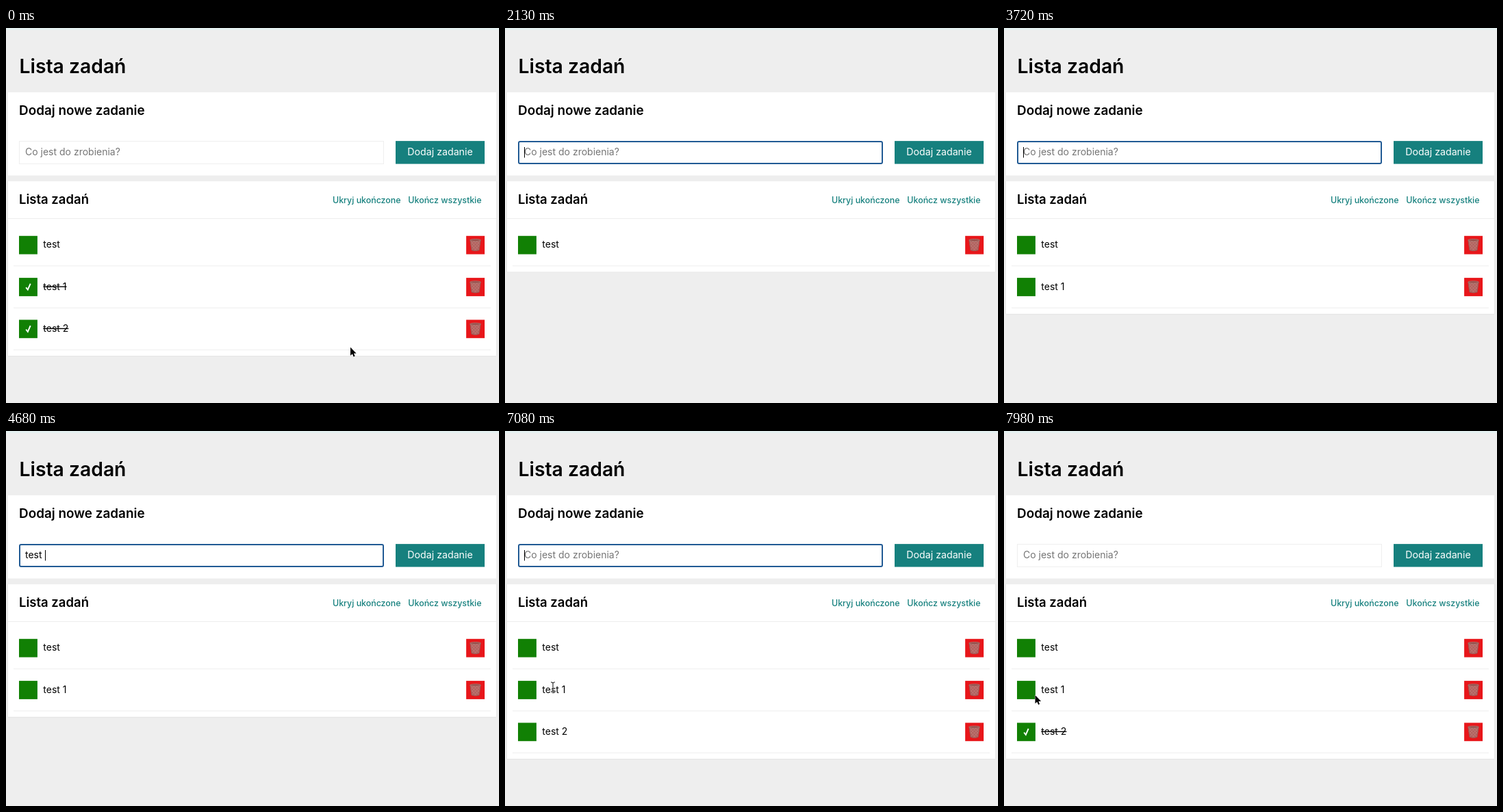
An HTML page for the animation above (8 s loop, 720 by 548 pixels).

```html
<!DOCTYPE html>
<html lang="pl">
<head>
<meta charset="utf-8">
<title>Lista zadań</title>
<style>
  html, body { margin: 0; width: 100%; height: 100%; overflow: hidden; background: #eee; }
  svg { display: block; width: 720px; height: 548px; }
  text { font: 400 14px Inter, "Open Sans", sans-serif; white-space: pre; }
  .title { font-size: 28.3px; font-weight: 600; }
  .head { font-size: 18.5px; font-weight: 600; }
  .link { font-size: 12.4px; font-weight: 500; fill: #16807e; }
  .done text { text-decoration: line-through; }
  .check { display: none; }
  .done .check { display: inline; }
</style>
</head>
<body>
<svg viewBox="0 0 720 548">
  <defs>
    <g id="bin">
      <path d="M5.8 6 L8 20.8 Q13.5 22.8 19 20.8 L21.2 6Z" fill="#b0615e"/>
      <path d="M7 8 L18.6 20 M10.5 7 L19.4 16 M14.5 7 L20.3 12.5 M7.6 13 L15.5 21.5 M20 8 L8.4 20 M16.5 7 L7.6 16 M12.5 7 L6.7 12.5 M19.4 13 L11.5 21.5"
        stroke="#c07f7a" stroke-width=".8" fill="none"/>
      <path d="M5.8 6 L8 20.8 Q13.5 22.8 19 20.8 L21.2 6" stroke="#935a55" stroke-width=".8" fill="none"/>
      <ellipse cx="13.5" cy="6" rx="7.8" ry="1.5" fill="#984c49" stroke="#a58078" stroke-width=".8"/>
    </g>
  </defs>
  <rect width="720" height="548" fill="#eee"/>
  <rect width="720" height="3" fill="#e5f1f1"/>
  <text class="title" x="19.5" y="66">Lista zadań</text>

  <rect x="3" y="94" width="713" height="121.5" fill="#fff"/>
  <text class="head" x="19" y="126.7" style="font-size:18.9px">Dodaj nowe zadanie</text>
  <rect id="field" fill="#fff"/>
  <text id="entry" x="28" y="186.3"></text>
  <rect id="caret" y="174" width="1" height="15.5"/>
  <rect x="569" y="165.1" width="130" height="33.5" fill="#16807e"/>
  <text x="634" y="186.3" text-anchor="middle" fill="#fff" style="font-size:14.2px">Dodaj zadanie</text>

  <rect id="shade" x="2.5" y="223" width="714" rx="1" fill="#dedede"/>
  <rect id="card" x="3" y="223.5" width="713" fill="#fff"/>
  <text class="head" x="19" y="257">Lista zadań</text>
  <rect x="3" y="278" width="713" height="1" fill="#eee"/>
  <g id="links">
    <text class="link" x="477" y="255.5">Ukryj ukończone</text>
    <text class="link" x="694.5" y="255.5" text-anchor="end">Ukończ wszystkie</text>
  </g>
  <g id="rows"></g>

  <path id="arrow" d="M0 0 V12.3 L2.8 9.8 L4.7 14 L6.6 13.1 L4.9 9.1 H8.6Z" fill="#000" stroke="#fff" stroke-width=".9" paint-order="stroke"/>
  <g id="beam" fill="none">
    <path d="M-3 -7 Q0 -7 0 -5 Q0 -7 3 -7 M0 -5 V5 M-3 7 Q0 7 0 5 Q0 7 3 7 M-1.6 2.5 H1.6" stroke="#fff" stroke-width="2.4"/>
    <path d="M-3 -7 Q0 -7 0 -5 Q0 -7 3 -7 M0 -5 V5 M-3 7 Q0 7 0 5 Q0 7 3 7 M-1.6 2.5 H1.6" stroke="#222" stroke-width="1.1"/>
  </g>
</svg>
<script>
const $ = id => document.getElementById(id);
const LOOP = 8000, RESET = 450, FOCUS = 720, CHECK = 7560, PITCH = 61.3;
const NAMES = ["test", "test 1", "test 2"];
const HINT = "Co jest do zrobienia?";

// Each entry: what is typed, the time of every key, the time it is added.
const ENTRIES = [
  { text: "test ", keys: [780, 860, 940, 1020, 1110], add: 1380 },
  { text: "test 1", keys: [2250, 2340, 2430, 2520, 2610, 2700], add: 2940 },
  { text: "test 2", keys: [4350, 4430, 4510, 4590, 4670, 5790], add: 6090 }
];

// Pointer path: time, x, y
const START = [[450, 200, 56], [630, 200, 56], [720, 110, 186]];
const END = [[6690, 110, 186], [7080, 70, 374], [7400, 33, 439], [7620, 33, 439], [7950, 45.5, 386]];

$("rows").innerHTML = NAMES.map((name, i) => `
  <g transform="translate(0 ${(i * PITCH).toFixed(1)})">
    <rect x="19" y="303.8" width="26.9" height="26.8" fill="#118004"/>
    <path class="check" d="M29.2 317.9 L31.8 321.2 L35.7 312.4" fill="none" stroke="#fff" stroke-width="1.9"/>
    <text x="54.3" y="321.4">${name}</text>
    <rect x="672.1" y="303.8" width="26.9" height="26.8" fill="#e8161a"/>
    <use href="#bin" x="672" y="304"/>
    <rect x="11" y="347.2" width="697" height="1" fill="#eee"/>
  </g>`).join("");
const rows = [...$("rows").children];
const pen = document.createElement("canvas").getContext("2d");

function set(el, attrs) {
  for (const k in attrs) el.setAttribute(k, attrs[k]);
}
function show(el, on) {
  el.style.display = on ? "" : "none";
}

function along(path, t) {
  const last = path[path.length - 1];
  if (t >= last[0]) return last.slice(1);
  const i = path.findIndex(p => p[0] > t);
  const [a, b] = [path[i - 1], path[i]];
  const u = (t - a[0]) / (b[0] - a[0]);
  const e = u * u * (3 - 2 * u);
  return [a[1] + (b[1] - a[1]) * e, a[2] + (b[2] - a[2]) * e];
}

function pointer(t) {
  if (t < RESET) return [503, 466.5];
  if (t < ENTRIES[0].keys[0]) return along(START, t);
  return t < END[0][0] ? null : along(END, t);
}

function typed(t) {
  const entry = ENTRIES.find(e => t >= e.keys[0] && t < e.add);
  return entry ? entry.text.slice(0, entry.keys.filter(k => k <= t).length) : "";
}

// Solid after a key, then half a second off and on with short fades.
function caretAlpha(t) {
  const since = Math.max(FOCUS, ...ENTRIES.flatMap(e => e.keys).filter(k => k <= t));
  const p = (t - since) % 1000;
  if (p < 440) return 1;
  if (p < 500) return (500 - p) / 60;
  return p < 940 ? 0 : (p - 940) / 60;
}

function drawField(t) {
  const focus = t >= FOCUS && t < CHECK;
  const text = typed(t);
  set($("field"), focus
    ? { x: 20, y: 166, width: 531, height: 32, rx: 2, stroke: "#215a94", "stroke-width": 2 }
    : { x: 19.5, y: 165.5, width: 532, height: 33, rx: 0, stroke: "#eee", "stroke-width": 1 });
  $("entry").textContent = text || HINT;
  set($("entry"), { fill: text ? "#000" : "#757575" });
  pen.font = "400 14px Inter, 'Open Sans', sans-serif";
  set($("caret"), {
    x: Math.round(28 + pen.measureText(text).width),
    opacity: focus ? caretAlpha(t) : 0
  });
}

function drawList(t) {
  const old = t < RESET;
  const count = old ? 3 : ENTRIES.filter(e => e.add <= t).length;
  const bottom = count ? 295.2 + count * PITCH : 287.5;
  set($("card"), { height: bottom - 223.5 });
  set($("shade"), { height: bottom - 222.4 });
  show($("links"), count);
  rows.forEach((row, i) => {
    show(row, i < count);
    row.classList.toggle("done", old ? i > 0 : i === 2 && t >= CHECK);
  });
}

function drawPointer(t) {
  const at = pointer(t);
  let beam = false;
  if (at) {
    const [x, y] = at;
    const overField = y > 165 && y < 199 && x > 19 && x < 552;
    const overName = x > 54 && x < 92 && y > 300 && Math.abs((y - 317) % PITCH - PITCH / 2) > 20;
    beam = overField || overName;
    const move = `translate(${x.toFixed(1)} ${y.toFixed(1)})`;
    set($("arrow"), { transform: move });
    set($("beam"), { transform: move });
  }
  show($("arrow"), at && !beam);
  show($("beam"), at && beam);
}

function frame() {
  const t = performance.now() % LOOP;
  drawField(t);
  drawList(t);
  drawPointer(t);
  requestAnimationFrame(frame);
}
frame();
</script>
</body>
</html>
```
